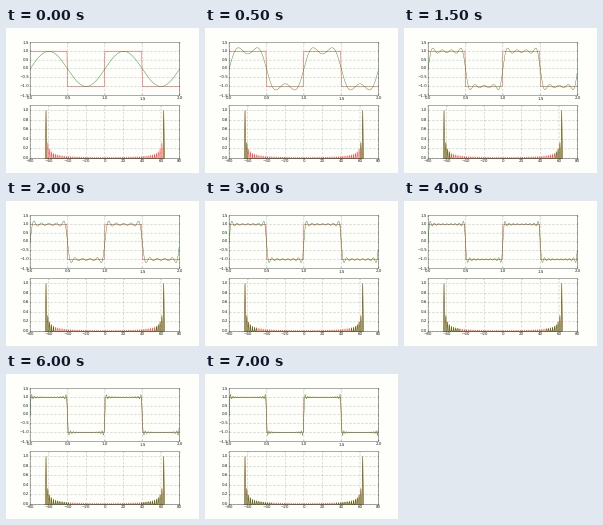
Recreate the animation shown at these times as a matplotlib script. Size 193 by 145 pixels, loop 7500 ms.

```python
import numpy as np
import matplotlib.pyplot as plt
from matplotlib.animation import FuncAnimation

DPI = 100
PX = 72 / DPI          # one pixel in points
STEPS = 15
RATE = 128             # samples per second

plt.rcParams.update({
    "font.family": "DejaVu Sans",
    "font.size": 4.02 * PX,
    "text.hinting": "none",
    "path.snap": False,
    "axes.facecolor": "none",
    "axes.edgecolor": "0.1",
    "axes.linewidth": 0.36 * PX,
    "axes.axisbelow": True,
    "xtick.direction": "in", "ytick.direction": "in",
    "xtick.top": True, "ytick.right": True,
    "xtick.labelcolor": "0.15", "ytick.labelcolor": "0.15",
    "xtick.major.size": 1.3 * PX, "ytick.major.size": 1.3 * PX,
    "xtick.major.width": 0.2 * PX, "ytick.major.width": 0.2 * PX,
    "xtick.major.pad": 1.3 * PX, "ytick.major.pad": 1.3 * PX,
})

RED, GREEN = (1, 0, 0), (0, 0.5, 0)
LINE = dict(lw=0.36 * PX, solid_joinstyle="round")

t = np.arange(2 * RATE) / RATE
freq = np.arange(-RATE, RATE) / 2
square = np.where(t % 1 < 0.5, 1.0, -1.0)


def partial_sum(n):
    if n == 1:
        return np.sin(2 * np.pi * t)
    k = np.arange(1, 2 * n, 2)[:, None]
    return 4 / np.pi * (np.sin(2 * np.pi * k * t) / k).sum(axis=0)


def spectrum(limit):
    """Odd harmonics below limit, counted inwards from both band edges."""
    k = RATE / 2 - np.abs(freq)
    odd = (k % 2 == 1) & (k < limit)
    return np.where(odd, np.sin(np.pi / RATE) / np.sin(np.pi * k / RATE + 1e-9), 0)


def setup(ax, xlim, ylim, xticks, yticks):
    ax.set(xlim=xlim, ylim=ylim, xticks=xticks, yticks=yticks)
    ax.grid(color="0.5", lw=0.25 * PX, ls=(0, (2.6 / 0.25, 1.4 / 0.25)))


fig, (top, low) = plt.subplots(2, 1, figsize=(1.93, 1.45), dpi=DPI,
                               facecolor="#fefefa")
fig.subplots_adjust(left=0.125, right=0.9, bottom=0.1, top=0.9, hspace=0.2)
setup(top, (0, 2), (-1.5, 1.5), np.arange(0, 2.1, 0.5), np.arange(-1.5, 1.6, 0.5))
setup(low, (-80, 80), (0, 1.1), np.arange(-80, 81, 20), np.arange(0, 1.1, 0.2))

top.plot(t, square, color=RED, **LINE)
low.plot(freq, spectrum(RATE), color=RED, **LINE)
wave, = top.plot([], [], color=GREEN, **LINE)
bars, = low.plot([], [], color=GREEN, **LINE)


def update(i):
    wave.set_data(t, partial_sum(i + 1))
    bars.set_data(freq, spectrum(2 * i + 2))
    return wave, bars


anim = FuncAnimation(fig, update, frames=STEPS, interval=500, repeat=True,
                     repeat_delay=0)
plt.show()
```
